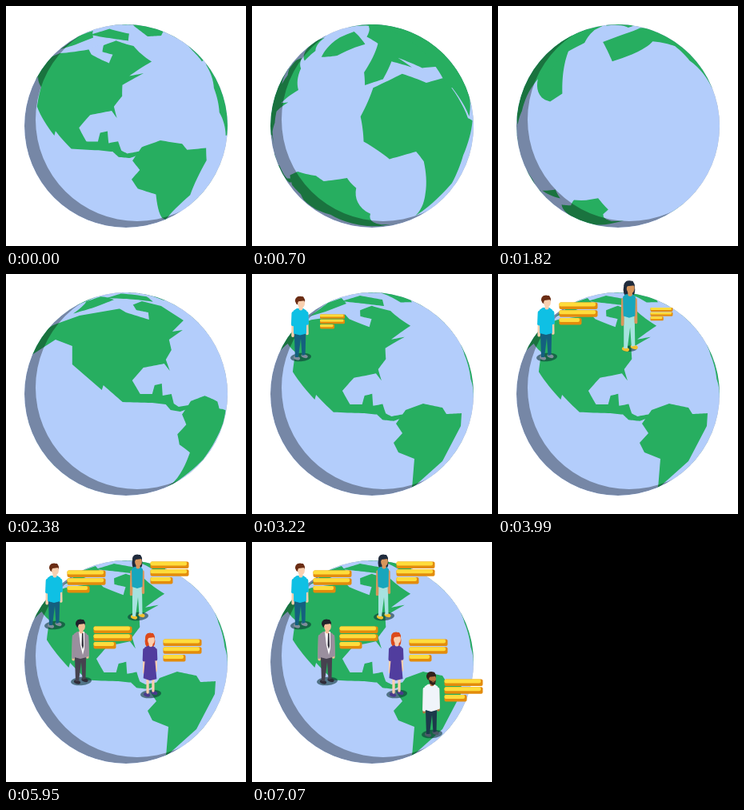
An HTML page with a canvas that plays this animation: 300x300 px, repeating every 8000 ms.

```html
<!DOCTYPE html>
<html>
<head>
<meta charset="utf-8">
<style>
html, body { margin: 0; width: 100%; height: 100%; overflow: hidden; background: #fff; }
canvas { display: block; width: 100vw; height: 100vh; }
</style>
</head>
<body>
<canvas id="stage" width="300" height="300"></canvas>
<script>
const ctx = document.getElementById('stage').getContext('2d');
const LOOP = 8000, R = 127, MID = 150, RAD = Math.PI / 180;
const C = Math.cos(16 * RAD), S = Math.sin(16 * RAD); // roll of the globe axis
const SEA = '#b3cdfb', LAND = '#27ae60';
const PERIOD = 472; // the map is stretched, so one trip around it is longer than 360 degrees
const clamp = (v, lo, hi) => Math.min(hi, Math.max(lo, v));

// Longitude and latitude of a stage point when the globe faces the angle `view`
function toSphere(px, py, view) {
  const dx = px - MID, dy = py - MID;
  let e = C * dx - S * dy, n = -S * dx - C * dy;
  const k = Math.min(1, R / Math.hypot(e, n));
  e *= k; n *= k;
  const z = Math.sqrt(Math.max(0, R * R - e * e - n * n));
  return { lat: Math.asin(n / R), lon: view + Math.atan2(e, z) / RAD };
}

const patches = [];
function patch(view, color, ...p) {
  const pts = [], steps = 8;
  for (let i = 0; i < p.length; i += 2) {
    const j = (i + 2) % p.length;
    for (let f = 0; f < 1; f += 1 / steps)
      pts.push(toSphere(p[i] + (p[j] - p[i]) * f, p[i + 1] + (p[j + 1] - p[i + 1]) * f, view));
  }
  patches.push({ view, color, pts });
}
const AMERICA = 450.5, AFRICA = 120, ASIA = 232;

// North America, Hudson Bay, arctic islands, Greenland
patch(AMERICA, LAND, 20,104, 34,100, 62,82, 83,90, 83,113, 120,145, 122,139, 146,160, 183,161, 200,163, 206,170,
  218,172, 229,168, 228,164, 216,166, 210,162, 207,150, 196,152, 195,137, 186,139, 183,150, 168,150, 158,133,
  172,117, 198,112, 205,121, 200,107, 207,95, 204,82, 221,70, 208,72, 222,58, 194,40, 170,34, 150,42, 92,52,
  64,62, 20,80);
patch(AMERICA, SEA, 140,42, 158,37, 163,45, 178,48, 179,57, 150,48);
patch(0, LAND, 72,53, 95,36, 112,30, 118,37, 92,47);
patch(0, LAND, 112,34, 135,27, 163,32, 165,40, 140,37);
patch(11, LAND, 153,15, 160,25, 177,38, 194,37, 200,25);
// South America
patch(0, LAND, 180,187, 192,170, 214,162, 238,167, 243,175, 262,174, 261,190, 238,234, 200,268, 203,231, 183,223,
  177,211, 188,199);
// Africa, then Europe with Arabia
patch(AFRICA, LAND, 86,121, 124,103, 155,114, 187,105, 229,152, 246,152, 225,198, 220,230, 188,267, 174,247,
  153,212, 139,201, 107,210, 75,188, 70,157);
patch(AFRICA, LAND, 78,117, 81,100, 112,60, 107,49, 126,32, 160,10, 260,50, 290,100, 257,103, 252,114, 233,149,
  187,105, 190,89, 155,94, 126,81, 140,94, 116,86, 99,110);
// Asia, Caspian Sea, eastern Siberia
patch(ASIA, LAND, 10,160, 38,172, 48,188, 63,180, 49,168, 72,160, 106,198, 112,178, 133,151, 151,158, 161,176,
  174,182, 166,171, 180,172, 191,167, 180,148, 206,130, 212,113, 197,88, 214,94, 219,77, 208,46, 245,68,
  230,25, 150,5, 40,55, 10,110);
patch(ASIA, SEA, 40,120, 46,118, 49,137, 42,142);
patch(320, LAND, 88,58, 106,72, 117,50, 140,37, 130,15, 70,30);
// Islands and Australia
patch(ASIA, LAND, 163,176, 172,181, 181,195, 174,196);
patch(ASIA, LAND, 168,203, 190,208, 190,213, 172,209);
patch(ASIA, LAND, 194,207, 211,205, 206,214);
patch(ASIA, LAND, 197,190, 213,171, 217,180, 212,199, 199,198);
patch(ASIA, LAND, 220,183, 229,179, 224,190, 219,198);
patch(ASIA, LAND, 217,151, 222,152, 231,163, 226,172);
patch(ASIA, LAND, 239,178, 262,175, 257,189);
patch(ASIA, LAND, 211,245, 216,230, 248,200, 256,202, 264,194, 270,205, 232,247);

// One trip around the map, easing in and out
const SPIN_TIME = 2736, SPIN_FROM = 11;
function spin(t) {
  const p = clamp(t / SPIN_TIME, 0, 1);
  return SPIN_FROM + (PERIOD - SPIN_FROM) * p * p * (3 - 2 * p);
}

function disc(x, y) {
  ctx.moveTo(x + R, y);
  ctx.arc(x, y, R, 0, 7);
}

function drawGlobe(t) {
  const facing = spin(t);
  ctx.save();
  ctx.beginPath();
  disc(MID, MID);
  ctx.fillStyle = SEA;
  ctx.fill();
  ctx.clip();
  for (const { view, color, pts } of patches) {
    const base = facing - PERIOD * Math.round((facing - view) / PERIOD);
    ctx.beginPath();
    for (const { lat, lon } of pts) {
      const a = clamp(lon - base, -90, 90) * RAD; // hidden points rest on the rim
      const e = R * Math.cos(lat) * Math.sin(a), n = R * Math.sin(lat);
      ctx.lineTo(MID + C * e - S * n, MID - S * e - C * n);
    }
    ctx.fillStyle = color;
    ctx.fill();
  }
  ctx.beginPath();
  disc(MID, MID);
  disc(164, 142);
  ctx.fillStyle = 'rgba(0,0,0,.34)';
  ctx.fill('evenodd');
  ctx.restore();
}

function poly(color, ...p) {
  ctx.fillStyle = color;
  ctx.beginPath();
  for (let i = 0; i < p.length; i += 2) ctx.lineTo(p[i], p[i + 1]);
  ctx.fill();
}
function oval(color, x, y, rx, ry, rot = 0) {
  ctx.fillStyle = color;
  ctx.beginPath();
  ctx.ellipse(x, y, rx, ry, rot, 0, 7);
  ctx.fill();
}
function limb(color, w, x1, y1, x2, y2) {
  ctx.strokeStyle = color;
  ctx.lineWidth = w;
  ctx.lineCap = 'round';
  ctx.beginPath();
  ctx.moveTo(x1, y1);
  ctx.lineTo(x2, y2);
  ctx.stroke();
}
function pill(color, x, y, w, h) {
  ctx.fillStyle = color;
  ctx.beginPath();
  ctx.roundRect(x, y, w, h, 2);
  ctx.fill();
}

const people = [
  { x: 60, y: 105, skin: '#f9d0b0', hair: '#6b2d14', top: '#0fc0e4', sleeve: .5, legs: '#14607f', shoe: '#7f8c9b' },
  { x: 164, y: 94, skin: '#d8965c', hair: '#202b3c', top: '#18a6bc', sleeve: 0, legs: '#a6e2df', shoe: '#f2c12e', long: 1 },
  { x: 93, y: 175, skin: '#f3bd96', hair: '#20222b', top: '#9a8f9e', sleeve: .9, legs: '#46424f', shoe: '#2f2c38', suit: 1 },
  { x: 180, y: 191, skin: '#fbcfae', hair: '#dc4a1b', top: '#513d9e', sleeve: .45, legs: '#fbcfae', shoe: '#4a3a8c', long: 1, dress: 1 },
  { x: 224, y: 241, skin: '#b8733f', hair: '#33211a', top: '#f0f4fa', sleeve: .9, legs: '#1c3a4b', shoe: '#4b5a68', beard: 1 }
];

// Feet at the origin, about 80 tall
function drawFigure(p) {
  const w = p.long ? 7 : 8.3, hem = p.long ? -38 : -31;
  oval(p.shoe, -4, 0, 4.2, 2.4, .3);
  oval(p.shoe, 5.5, -2.5, 4.2, 2.3, .3);
  if (p.dress) {
    limb(p.legs, 3.3, -3, -22, -3, -3);
    limb(p.legs, 3.3, 4, -22, 4, -5);
  } else {
    poly(p.legs, 1 - w, -39, w - 1, -39, 6.5, -4, 2.5, -3, 1, -25, -2, -1, -6, -1);
  }
  if (p.long) oval(p.hair, 0, -68, 6.5, 9.5);
  for (const side of [-w, w]) {
    const out = side * 1.07, len = 27.5 - side / 6;
    limb(p.skin, 3.4, side, -57, out, -57 + len);
    if (p.sleeve) limb(p.top, 4, side, -57, out, -57 + len * p.sleeve);
  }
  if (p.dress) poly(p.top, -w, -60, 0, -63, w, -60, 6.5, -43, 8.5, -20, 0, -18, -8.5, -21, -6.5, -43);
  else poly(p.top, -w, -60, -4, -63, 4, -63, w, -60, w - .5, hem, 0, hem + 2, .5 - w, hem);
  if (p.suit) {
    poly('#fff', -2, -63, 5, -63, 5, -42, 3, -34, 0, -46);
    poly('#33323d', 2, -61, 3.5, -61, 4, -45, 3, -41, 1.5, -46);
  }
  limb(p.skin, 5, 1, -67, 1, -63);
  oval(p.hair, 0, -73, 6, 5.6);
  oval(p.skin, 1.5, -69.5, 4.4, 5.8);
  poly(p.hair, -5.5, -73, -3, -78, 4, -78, 6, -73, -2, -72, -4, -68);
  if (p.beard) {
    poly(p.hair, -3, -69, 0, -67, 5, -67, 6, -69, 5, -63, 2, -61.5, -2, -64);
    limb(p.skin, 1, 1.5, -66, 3.5, -66);
  }
}

function drawBars() {
  [48, 48, 28].forEach((w, i) => {
    const y = i * 9.7 - 42;
    pill('#e38c0c', -24, y, w, 8.5);
    pill('#ffdc3c', -24, y, w - 2.5, 5);
  });
}

// Shoots up, then wobbles around full size
function pop(u) {
  if (u < 0) return Math.max(0, 1 + u / 90);
  if (u > 775) return 1;
  return 1 + .25 * Math.exp(-u / 190) * Math.sin(u / 240 * 2 * Math.PI);
}

function scaled(x, y, sx, sy, draw) {
  if (sx <= 0 || sy <= 0) return;
  ctx.save();
  ctx.translate(x, y);
  ctx.scale(sx, sy);
  draw();
  ctx.restore();
}

function drawPerson(p, t) {
  const shade = clamp((t - 105) / 110, 0, 1);
  const bars = clamp((t - 90) / 395, 0, 1) ** .38;
  scaled(p.x, p.y, shade, shade, () => oval('rgba(10,50,50,.58)', 1, -1, 13, 5.2, -.08));
  scaled(p.x, p.y, pop(t - 100), pop(t - 90), () => drawFigure(p));
  scaled(p.x + 40.5, p.y - 27.5, bars, bars, drawBars);
}

function frame(now) {
  const t = now % LOOP;
  ctx.fillStyle = '#fff';
  ctx.fillRect(0, 0, 300, 300);
  drawGlobe(t);
  people.forEach((p, i) => drawPerson(p, t - 3005 - 800 * i));
}

let start;
function tick(now) {
  start ??= now;
  frame(now - start);
  requestAnimationFrame(tick);
}
frame(0);
requestAnimationFrame(tick);
</script>
</body>
</html>
```
